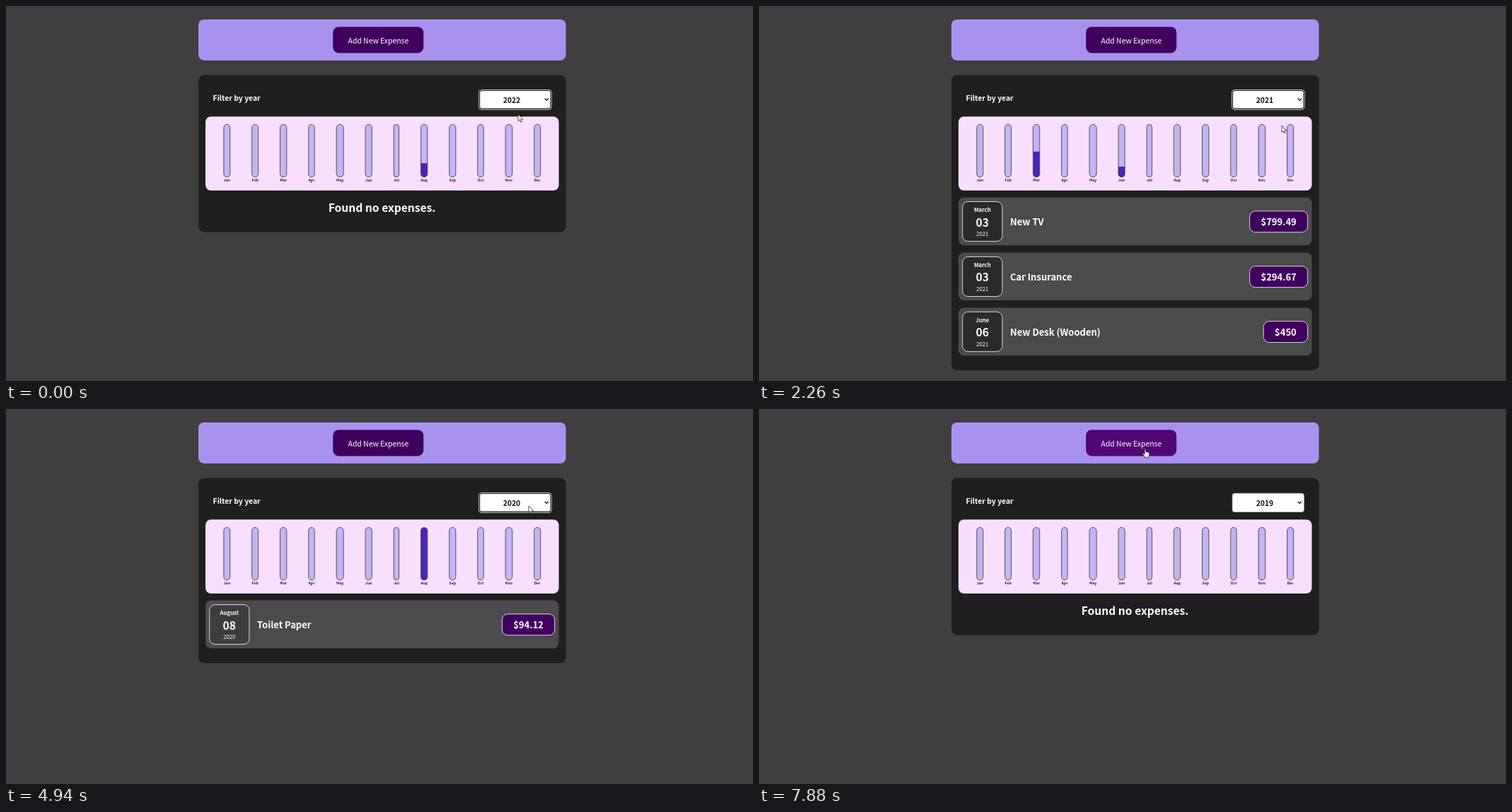
Recreate the animation shown at these times as an HTML page. Size 1056 by 530 pixels, loop 8000 ms.

```html
<!DOCTYPE html>
<html lang="en">
<head>
<meta charset="utf-8">
<title>Expenses</title>
<style>
  html, body { margin: 0; width: 100%; height: 100%; overflow: hidden; background: #3f3f3f; }
  svg { display: block; width: 1056px; height: 530px; }
  text { font-family: "Noto Sans CJK JP", "Noto Sans CJK SC", "Noto Sans CJK", "Noto Sans JP", "Open Sans", sans-serif; }
</style>
</head>
<body>
<svg id="stage" viewBox="0 0 1056 530" xmlns="http://www.w3.org/2000/svg"></svg>
<script>
const LOOP = 8000;
const STEP = 132;
const REM = 10.4;
const stage = document.getElementById('stage');

const box = (x, y, w, h, r, fill, extra = '') =>
  `<rect x="${x}" y="${y}" width="${w}" height="${h}" rx="${r}" fill="${fill}" ${extra}/>`;
const label = (x, y, size, str, { weight = 700, anchor = 'middle', fill = '#fff', id = '' } = {}) =>
  `<text x="${x}" y="${y}" font-size="${size}" font-weight="${weight}" ` +
  `text-anchor="${anchor}" fill="${fill}" ${id && `id="${id}"`}>${str}</text>`;

const el = id => document.getElementById(id);
const set = (id, attrs) => Object.entries(attrs).forEach(([k, v]) => el(id).setAttribute(k, v));
const show = (id, on) => set(id, { display: on ? 'inline' : 'none' });

const YEARS = [2022, 2021, 2020, 2019];
const MONTHS = 'Jan Feb Mar Apr May Jun Jul Aug Sep Oct Nov Dec'.split(' ');
const ITEMS = {
  2021: [
    ['March', '03', 'New TV', 799.49],
    ['March', '03', 'Car Insurance', 294.67],
    ['June', '06', 'New Desk (Wooden)', 450],
  ],
  2020: [['August', '08', 'Toilet Paper', 94.12]],
};

// Each year is picked from the menu in turn; lead = head start of its bars
const ROUNDS = [
  { pick: 0, lead: 163, year: 2022 },
  { open: 1060, pick: 2260, lead: 97, year: 2021 },
  { open: 3050, pick: 4250, lead: 116, year: 2020 },
  { open: 5220, pick: 6450, lead: 105, year: 2019 },
];
const BLUR_AT = 7880;
const EVENTS = ROUNDS.flatMap(r => [r.open || 0, r.pick]).concat(BLUR_AT);

const CHART = { x: 282, y: 156.3, w: 499.5, h: 104.4 };
const BAR = { y: 167.4, h: 74.4 };
const ROW = { y: 146.3, h: 15.6 };
const CARD = { y: 270.6, pitch: 77.9 };

const HOME = [739, 137], ASIDE = [664, 164], BUTTON = [546, 56];

// Pointer route: from home down to the row to pick, then back
const route = [[0, 724, 153], [380, 724, 153], [780, ...HOME]];
ROUNDS.slice(1).forEach(({ open, pick, year }) => {
  const target = [HOME[0], ROW.y + (YEARS.indexOf(year) + 0.45) * ROW.h];
  const next = year === 2019 ? ASIDE : HOME;
  route.push([open + 264, ...HOME], [open + 528, ...target], [pick + 150, ...target], [pick + 528, ...next]);
});
route.push([7200, ...ASIDE], [7500, ...BUTTON], [LOOP, ...BUTTON]);

function shares(year) {
  const sums = MONTHS.map(m => (ITEMS[year] || [])
    .reduce((sum, [month, , , cost]) => sum + (month.startsWith(m) ? cost : 0), 0));
  const max = Math.max(...sums) || 1;
  return sums.map(s => s / max);
}

function card([month, day, title, cost], i, year) {
  const y = CARD.y + i * CARD.pitch;
  const price = '$' + cost;
  const w = 31.4 + (price.length - (price.includes('.') ? 0.46 : 0)) * 7.73;
  const x = 775.6 - w;
  const line = 'stroke="#fff" stroke-width=".8"';
  return box(282, y, 499.5, 67.6, 7.8, '#4b4b4b') +
    box(287.7, y + 5.9, 56.2, 56.1, 7.8, year === 2021 ? '#2a2a2a' : '#3d3d3d', line) +
    label(315.8, y + 20.4, REM * 0.75, month) +
    label(315.8, y + 40.9, REM * 1.5, day) +
    label(315.8, y + 54.2, REM * 0.75, year, { weight: 500 }) +
    label(355, y + 39.4, REM * 1.25, title, { anchor: 'start' }) +
    box(x, y + 19.2, w, 29.9, 7.8, '#40005d', line) +
    label(x + w / 2, y + 39.3, REM * 1.25, price);
}

const list = year => `<g id="list${year}">${ITEMS[year].map((it, i) => card(it, i, year)).join('')}</g>`;

const bar = (name, i) =>
  `<clipPath id="clip${i}"><rect class="bar${i}"/></clipPath>` +
  `<rect class="bar${i}" fill="#c3b4f3"/>` +
  `<rect id="fill${i}" fill="#4826b9" clip-path="url(#clip${i})"/>` +
  `<rect class="bar${i}" fill="none" stroke="#313131" stroke-width=".8"/>` +
  label(0, 248.3, REM / 2, name, { fill: '#222', id: 'month' + i });

const menu = `<g id="menu">` +
  box(667.8, 148, 104.6, 63.4, 2, '#000', 'opacity=".12"') +
  box(669.6, 146.4, 100.8, 62.7, 0, '#fff', 'stroke="#767676" stroke-width=".9"') +
  box(670, ROW.y, 100, ROW.h, 0, '#1e90ff', 'id="mark"') +
  YEARS.map((y, i) => label(715.1, 159 + i * ROW.h, 11, y, { weight: 400, id: 'opt' + i })).join('') +
  `</g>`;

stage.innerHTML =
  box(272, 19, 519.5, 57.9, 7.8, '#a892ee') +
  box(462.2, 29.5, 128, 36.9, 7.8, '#40005d', 'id="button"') +
  label(526.4, 52.7, REM, 'Add New Expense', { weight: 500 }) +
  box(272, 97.4, 519.5, 222, 7.8, '#1f1f1f', 'id="panel"') +
  label(292.6, 134.2, REM, 'Filter by year', { anchor: 'start' }) +
  box(CHART.x, CHART.y, CHART.w, CHART.h, 7.8, '#f8dfff') +
  MONTHS.map(bar).join('') +
  list(2021) + list(2020) +
  `<g id="empty">${label(531.6, 291.2, REM * 1.5, 'Found no expenses.')}</g>` +
  box(669.2, 119.2, 101.2, 26.4, 3.4, '#fff', 'stroke="#c9c9c9" stroke-width=".6"') +
  `<g id="ring">` +
  box(668.2, 118.2, 103.3, 28.5, 4.4, '#fff') +
  box(669.5, 119.5, 100.7, 25.9, 3.4, '#fff', 'stroke="#101010" stroke-width="1.2"') +
  `</g>` +
  label(714.9, 136.8, REM, '', { fill: '#111', id: 'value' }) +
  `<path d="M761.7 130.8l2.6 2.6 2.6-2.6" fill="none" stroke="#111" stroke-width="1.3"/>` +
  menu +
  `<g id="pointer" stroke="#222" stroke-width=".8" stroke-linejoin="round" fill="#fff">
    <path id="arrow" d="M0 0V9.6L2.2 7.6 3.7 11 5.2 10.4 3.8 7.1H6.8Z"/>
    <path id="hand" d="M-.9 .8Q0 -.6 .9 .8V4.4L2.3 4.5 2.6 5 4 5 4.3 5.6Q5.7 5.2 5.8 6.6V9L4.6 11.2V12.4H-.8V11.2L-3.6 7.4Q-3.3 6 -2 6.8L-.9 8Z"/>
  </g>`;

// Bars are as wide as their month names, with equal space around each
function layoutBars() {
  const widths = MONTHS.map((_, i) => el('month' + i).getComputedTextLength());
  const gap = (CHART.w - 2 * REM - widths.reduce((a, b) => a + b)) / MONTHS.length;
  let x = CHART.x + REM + gap / 2;
  widths.forEach((full, i) => {
    const w = full - 0.4, left = x + 0.2;
    set('month' + i, { x: x + full / 2 });
    set('fill' + i, { x: left, width: w });
    stage.querySelectorAll('.bar' + i).forEach(r =>
      Object.entries({ x: left, y: BAR.y, width: w, height: BAR.h, rx: w / 2 })
        .forEach(([k, v]) => r.setAttribute(k, v)));
    x += full + gap;
  });
}

const easeOut = u => 1 - (1 - Math.min(1, u)) ** 1.7;

function pointerAt(t) {
  const i = route.findIndex(p => p[0] > t);
  const [t0, x0, y0] = route[i - 1], [t1, x1, y1] = route[i];
  const u = (t - t0) / (t1 - t0);
  return [x0 + (x1 - x0) * u, y0 + (y1 - y0) * u];
}

function draw(time) {
  const event = Math.max(...EVENTS.filter(e => e <= time));
  const t = event + Math.floor((time - event) / STEP) * STEP;
  const n = ROUNDS.filter(r => r.pick <= t).length - 1;
  const { pick, lead, year } = ROUNDS[n];
  const before = shares(n ? ROUNDS[n - 1].year : 2020);
  const p = easeOut((t - pick + lead) / 300);

  shares(year).forEach((share, i) => {
    const h = (before[i] + (share - before[i]) * p) * BAR.h;
    set('fill' + i, { y: BAR.y + BAR.h - h, height: h });
  });

  const count = (ITEMS[year] || []).length;
  set('panel', { height: count ? 183.7 + count * CARD.pitch : 222 });
  Object.keys(ITEMS).forEach(y => show('list' + y, +y === year));
  show('empty', !count);
  el('value').textContent = year;

  const [x, y] = pointerAt(t);
  const open = ROUNDS.some(r => t >= r.open && t < r.pick);
  show('menu', open);
  show('ring', !open && t < BLUR_AT);
  if (open) {
    const over = Math.floor((y - ROW.y) / ROW.h);
    const row = over < 0 ? YEARS.indexOf(year) : over;
    set('mark', { y: ROW.y + row * ROW.h });
    YEARS.forEach((_, i) => set('opt' + i, { fill: i === row ? '#fff' : '#222' }));
  }

  const hover = x < 590 && y < 67;
  set('button', { fill: hover ? '#510674' : '#40005d' });
  set('pointer', { transform: `translate(${x} ${y})` });
  show('arrow', !hover);
  show('hand', hover);
}

layoutBars();
const start = performance.now();
function tick() {
  draw((performance.now() - start) % LOOP);
  requestAnimationFrame(tick);
}
tick();
</script>
</body>
</html>
```
